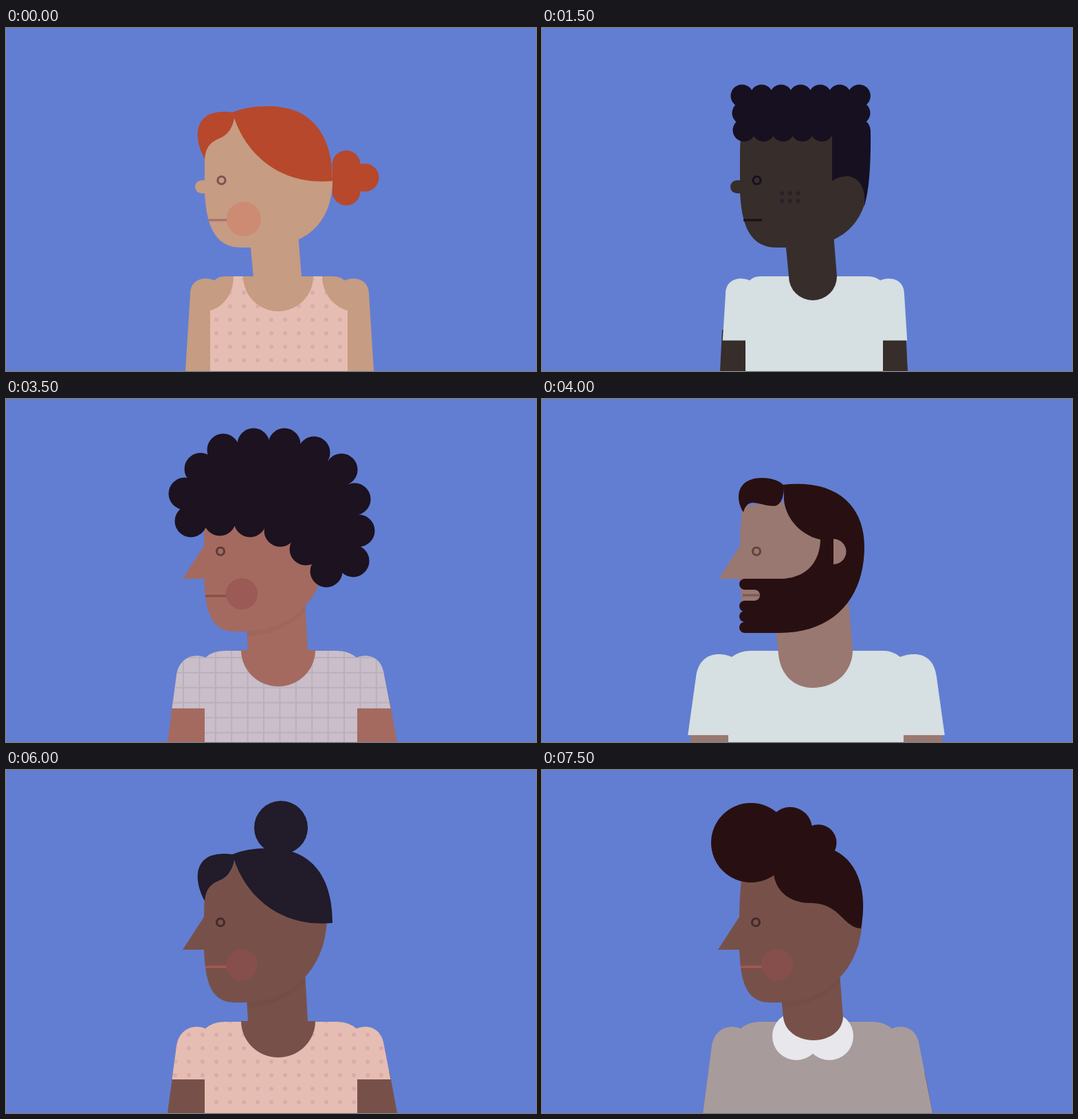
An HTML page that plays this animation: 771x500 px, repeating every 8 s.

```html
<!DOCTYPE html>
<html lang="en">
<head>
<meta charset="utf-8">
<title>Portraits</title>
<style>
html, body { margin: 0; width: 100%; height: 100%; overflow: hidden; background: #627ed2; }
svg { display: block; width: 771px; height: 500px; }
</style>
</head>
<body>
<svg id="stage" viewBox="0 0 771 500"></svg>
<script>
const HOLD = 500;

const path = (d, fill, more = '') => `<path d="${d}" fill="${fill}" ${more}/>`;
const line = (d, color, width) => path(d, 'none', `stroke="${color}" stroke-width="${width}"`);
const dot = (x, y, r, fill) => `<circle cx="${x}" cy="${y}" r="${r}" fill="${fill}"/>`;
const dots = (list, r, fill) => list.map(([x, y]) => dot(x, y, r, fill)).join('');
const row = (n, x, step, y) => Array.from({ length: n }, (_, i) => [x + i * step, y]);

// Shoulders, inner arm edges and bare forearms
const wide = right => ({
  shape: `M208 520L224 405C228 372 255 367 276 376Q288 367 304 367H497Q510 367 521 376C545 367 570 372 574 405L${right} 520Z`,
  l: 271, r: 526,
  arms: 'M216 480V500H271V480ZM526 480V500H582V480Z'
});
const BUILDS = {
  slim: {
    shape: 'M261 500L268 388C268 365 290 362 303 368Q309 362 318 362H475Q486 362 493 368C506 362 528 365 528 388L535 500Z',
    l: 297, r: 497,
    arms: 'M263 440L260 500H297V440ZM497 440V500H533L530 440Z'
  },
  mid: {
    shape: 'M235 500L248 402C252 376 275 370 290 377Q301 367 318 367H482Q498 367 510 377C526 370 547 376 550 402L569 500Z',
    l: 289, r: 511,
    arms: 'M243 440L235 500H289V440ZM511 440V500H569L558 440Z'
  },
  wide: wide(590),
  lean: wide(583)
};

const NECKS = {
  slim: 'M355 310L360 364H430L425 300Z',
  slimRound: 'M355 310L360 362A35 35 0 0 0 430 362L425 300Z',
  mid: 'M350 330L352 369H440L435 295Z',
  scoop: 'M350 330L352 366H342A54 53 0 0 0 450 366H439L435 295Z',
  round: 'M349 330L352 361C355 383 376 394 396 394C416 394 437 383 439 361L434 295Z',
  wide: 'M340 335L344 372C347 405 370 421 393 421C430 421 452 395 452 366L446 295Z',
  lean: 'M341 335L343 364A54 55 0 0 0 451 364L445 285Z'
};

const FACES = {
  soft: 'M290 160Q289 170 289 190V238C291 290 305 320 342 320H400L426 308C458 293 475 262 475 222Q474 150 400 150H320Z',
  sharp: 'M291 160Q288 190 288 214L257 262H288C290 305 296 339 333 339H345C415 339 466 290 467 215Q465 150 380 150Q300 150 291 160Z'
};

// Parted hair, shared by the bun styles
const parted = (h, s) =>
  path('M289 200C291 173 297 167 310 161C322 157 330 145 332 131L400 215Z', s) +
  path('M329 123Q350 114 382 114C440 114 475 150 475 223C400 230 350 185 332 131C330 145 322 157 310 161C297 167 291 173 289 191C275 165 273 135 298 125Q312 120 329 123Z', h);
const topKnot = (x, y, r) => (h, s) => dot(x, y, r, h) + parted(h, s);

const AFRO = [[269, 178], [260, 138], [283, 102], [316, 74], [360, 66], [405, 66], [448, 78], [488, 103],
  [507, 146], [513, 192], [505, 236], [466, 251], [436, 219], [399, 192], [355, 178], [311, 176]];

const HAIR = {
  bun: (h, s) => parted(h, s) + dots([[495, 199], [522, 218], [495, 238]], 20.5, h) +
    path('M475 199H515V238H475Z', h),
  knotMid: topKnot(395, 92, 30),
  knotLow: topKnot(415, 119, 26),
  knotHigh: topKnot(400, 84, 39),
  curls: h => dots([...row(7, 292, 28.4, 99), [294, 124], [462, 124], ...row(5, 295, 28.3, 149)], 16.5, h) +
    path('M292 99H462L470 135Q478 138 479 150Q480 230 469 262C474 240 465 217 445 216Q433 216 423 223V150H292Z', h),
  afro: h => path('M' + AFRO.join('L') + 'Z', h) + dots(AFRO, 23.5, h),
  quiff: h => path('M292 163C270 160 262 148 262 128C262 112 272 103 284 103C302 104 295 121 320 122C350 121 400 120 430 142C475 175 478 240 446 291C455 262 448 243 430 242Q417 242 406 250C404 200 375 162 325 166Q310 163 292 163Z', h),
  puffs: h => dot(305, 106, 58, h) + dot(362, 86, 32, h) + dot(403, 106, 26.5, h) +
    path('M338 150C340 175 360 195 395 194C435 196 440 230 465 231C475 180 462 135 428 118L350 100Z', h),
  beard: (h, s) =>
    path('M293 165C280 145 283 115 320 115C335 115 345 119 352 126C352 145 347 155 338 156C320 156 310 148 300 153Q295 157 293 165Z', h) +
    path('M295 262H350C385 260 404 238 405 205C370 197 350 165 352 140L351 125Q365 123 382 124C440 128 469 165 469 215C469 290 425 341 345 341H295Z', h) +
    dots([[295, 270], [295, 302], [295, 317], [295, 333]], 8, h) +
    path('M292 278H309A8 8 0 0 1 309 294H292Z', s) +
    path('M424 204A18.5 18.5 0 0 1 424 241Z', s)
};

const PRINTS = {
  dots: [20, 19.7, 296, 376, c => dot(10, 9.85, 3, c)],
  grid: [23.4, 21.9, 246.3, 366, c => line('M0 11H23.4M11.7 0V21.9', c, 2)],
  stripes: [31.7, 40, 224, 0, c => line('M15.8 0V40', c, 2.5)],
  lattice: [27, 27, 0, 0, c => line('M0 13.5H27M13.5 0V27', c, 3), 'rotate(45 393 430)']
};

const TANK = 'M297 500V412C318 406 331 386 331 362H345A51 51 0 0 0 447 362H460C460 386 476 406 497 412V500Z';
const BIB = 'M289 500V377Q298 371 307 369V430H493V369Q502 371 511 377V500Z';

function clothes(p, id) {
  const b = BUILDS[p.build];
  let defs = '', fill = p.shirt;
  let shape = p.cut || b.shape;
  let out = p.cut ? path(b.shape, p.skin) : path(b.arms, p.skin);
  const s = p.sleeve || 500;
  defs += `<clipPath id="c${id}"><path d="M0 0H771V${s}H${b.r}V500H${b.l}V${s}H0Z"/></clipPath>`;
  let layers = path(shape, fill);
  if (p.print) {
    const [w, h, x, y, draw, turn = ''] = PRINTS[p.print];
    defs += `<pattern id="p${id}" x="${x}" y="${y}" width="${w}" height="${h}" patternUnits="userSpaceOnUse" patternTransform="${turn}">${draw(p.ink)}</pattern>`;
    layers += path(shape, `url(#p${id})`);
  }
  out += `<g clip-path="url(#c${id})" ${p.lift ? `transform="translate(0 ${-p.lift})"` : ''}>${layers}</g>`;
  if (p.collar) out += dot(371, 388, 35, p.collar) + dot(419, 388, 35, p.collar);
  return defs + out;
}

function head(p, id) {
  const soft = p.face === 'soft', bearded = p.hair === 'beard';
  const neck = NECKS[p.neck], face = FACES[p.face || 'sharp'];
  let out = path(neck, p.skin);
  if (!soft && !bearded) {
    out += `<clipPath id="n${id}"><path d="${neck}"/></clipPath><g clip-path="url(#n${id})">` +
      path(face, '#000', `opacity="${p.shade || .04}" transform="translate(0 7)"`) + '</g>';
  }
  out += path(face, p.skin);
  if (soft) out += `<rect x="275" y="222" width="30" height="19" rx="9.5" fill="${p.skin}"/>`;
  out += `<circle cx="${soft ? 313.5 : 312}" cy="222" r="5.5" fill="none" stroke="${p.eye}" stroke-width="3.2"/>`;
  if (p.cheek) out += soft ? dot(346, 278.5, 25, p.cheek) : dot(343, 284, 23, p.cheek);
  if (p.spots) {
    const [n, x, step, ys] = soft ? [3, 350, 11.8, [241, 252]] : [4, 331, 11.3, [245, 256, 267]];
    out += ys.map(y => dots(row(n, x, step, y), 2.9, p.spots)).join('');
  }
  out += HAIR[p.hair](p.tint, p.skin);
  const mouth = bearded ? 'M292 286H316' : soft ? 'M294 280H321' : 'M290 287H320.5';
  return out + line(mouth, p.lip, 3.2);
}

const PEOPLE = [
  { build: 'slim', face: 'soft', neck: 'slim', hair: 'bun', skin: '#c69c82', tint: '#b7482b', eye: '#7d5452', lip: '#a9706f', cheek: '#cc8b72', shirt: '#e6bdb2', cut: TANK, print: 'dots', ink: '#d9abaa' },
  { build: 'mid', neck: 'scoop', hair: 'knotMid', skin: '#a46a60', tint: '#281012', eye: '#5d3a38', lip: '#8a4a48', cheek: '#9c5a57', shirt: '#d6dfe1', sleeve: 451 },
  { build: 'wide', neck: 'wide', hair: 'quiff', skin: '#775149', tint: '#211b2a', eye: '#3e2828', lip: '#54383a', shirt: '#c9bec9', sleeve: 490 },
  { build: 'slim', face: 'soft', neck: 'slimRound', hair: 'curls', skin: '#372d2b', tint: '#161021', eye: '#161021', lip: '#1b1218', spots: '#292129', shirt: '#d6dfe1', sleeve: 455.5, shift: -1 },
  { build: 'wide', neck: 'wide', hair: 'beard', skin: '#c69c82', tint: '#b7482b', eye: '#7d5452', lip: '#a9706f', shirt: '#9292a2', sleeve: 490, print: 'stripes', ink: '#84849a' },
  { build: 'wide', neck: 'wide', hair: 'beard', skin: '#7d5452', tint: '#211b2a', eye: '#2c2027', lip: '#654548', shirt: '#929294', sleeve: 490, print: 'lattice', ink: '#86868f' },
  { build: 'mid', neck: 'mid', hair: 'knotLow', skin: '#c69c82', tint: '#521b2d', eye: '#7d5452', lip: '#b0504a', spots: '#a9706f', shirt: '#e6bdb2', cut: BIB },
  { build: 'mid', neck: 'scoop', hair: 'afro', skin: '#a46a60', tint: '#1c1220', eye: '#5d3d38', lip: '#8b4c4a', cheek: '#9c5a57', shirt: '#c9bec9', sleeve: 451, print: 'grid', ink: '#bab0bb' },
  { build: 'wide', neck: 'wide', hair: 'beard', skin: '#997871', tint: '#281012', eye: '#65413f', lip: '#7b5957', shirt: '#d6dfe1', sleeve: 490 },
  { build: 'mid', neck: 'round', hair: 'puffs', skin: '#9a6850', tint: '#1c1220', eye: '#5d3d38', lip: '#b0504a', cheek: '#965949', shirt: '#c9bec9', collar: '#e7e7ec' },
  { build: 'lean', neck: 'lean', hair: 'quiff', skin: '#997871', tint: '#ccb8c0', eye: '#65413f', lip: '#7b5957', shade: .1, shirt: '#9292a2', sleeve: 500.5, print: 'stripes', ink: '#84849a', lift: 2 },
  { build: 'wide', neck: 'wide', hair: 'beard', skin: '#a46a60', tint: '#521b2d', eye: '#5d3d38', lip: '#8b4c4a', shirt: '#929294', sleeve: 490 },
  { build: 'mid', neck: 'scoop', hair: 'knotHigh', skin: '#775149', tint: '#211b2a', eye: '#432b2a', lip: '#a85855', cheek: '#864f4b', shirt: '#e6bdb2', sleeve: 451, print: 'dots', ink: '#d9abaa' },
  { build: 'mid', neck: 'mid', hair: 'afro', skin: '#9a6850', tint: '#521b2d', eye: '#5d4139', lip: '#b0504a', spots: '#7c4a47', shirt: '#aa8a7c', cut: BIB },
  { build: 'mid', neck: 'scoop', hair: 'afro', skin: '#775149', tint: '#281012', eye: '#432b2a', lip: '#a85855', shirt: '#d6dfe1', sleeve: 451 },
  { build: 'mid', neck: 'round', hair: 'puffs', skin: '#775149', tint: '#281012', eye: '#432b2a', lip: '#a85855', cheek: '#864f4b', shirt: '#a89b9b', collar: '#e7e7ec', shift: -1 }
];

const stage = document.getElementById('stage');
stage.innerHTML = PEOPLE.map((p, i) =>
  `<g class="person" visibility="hidden" transform="translate(${p.shift || 0} 0)">${clothes(p, i)}${head(p, i)}</g>`).join('');
const groups = [...stage.querySelectorAll('.person')];

let shown = -1;
function tick() {
  const next = Math.floor(performance.now() / HOLD) % groups.length;
  if (next !== shown) {
    groups.forEach((g, i) => g.setAttribute('visibility', i === next ? 'visible' : 'hidden'));
    shown = next;
  }
  requestAnimationFrame(tick);
}
tick();
</script>
</body>
</html>
```
